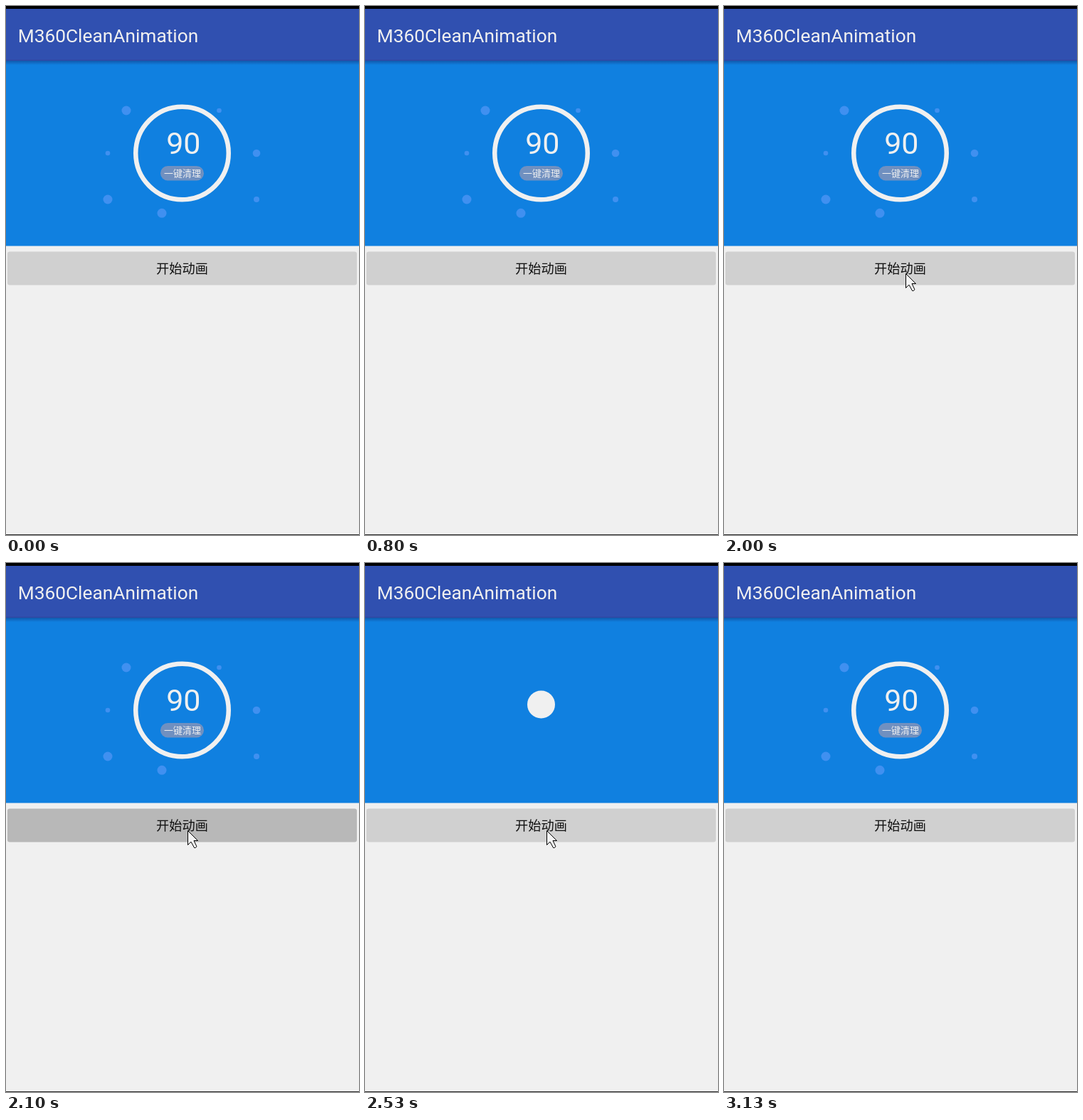
An HTML page that plays this animation: 496x744 px, repeating every 4.03 s.

```html
<!DOCTYPE html>
<html lang="zh-CN">
<head>
<meta charset="utf-8">
<title>M360CleanAnimation</title>
<style>
  html, body { margin: 0; width: 100%; height: 100%; overflow: hidden; background: #f0f0f0; }
  svg { display: block; width: 100vw; height: 100vh; }
  .latin { font-family: Roboto, sans-serif; fill: #f0f0f0; }
  .han { font-family: "Noto Sans CJK SC", "Noto Sans CJK", sans-serif; text-anchor: middle; }
</style>
</head>
<body>
<svg viewBox="0 0 496 744" preserveAspectRatio="none">
  <defs>
    <linearGradient id="shade" x1="0" y1="0" x2="0" y2="1">
      <stop offset="0" stop-color="#102060" stop-opacity=".4"/>
      <stop offset="1" stop-color="#102060" stop-opacity="0"/>
    </linearGradient>
  </defs>
  <rect width="496" height="744" fill="#f0f0f0"/>
  <rect y="77" width="496" height="260.5" fill="#1080e0"/>

  <g id="dots" fill="#4090f0"></g>
  <circle id="ball" cx="247.5" r="19.5" fill="#f0f0f0"/>
  <circle id="ring" cx="247.5" cy="207" fill="none" stroke="#f0f0f0" stroke-width="6.5"/>
  <g id="label">
    <text class="latin" x="249.3" y="208.3" font-size="43" text-anchor="middle">90</text>
    <rect x="217" y="225" width="61" height="20.5" rx="10.25" fill="#7090c0"/>
    <text class="han" x="248" y="240.2" font-size="13" fill="#f0f0f0">一键清理</text>
  </g>

  <rect y="77" width="496" height="6" fill="url(#shade)"/>
  <rect y="4" width="496" height="73" fill="#3050b0"/>
  <rect y="75.5" width="496" height="1.5" fill="#3048a4"/>
  <rect width="496" height="4" fill="#000"/>
  <text class="latin" x="16.7" y="51" font-size="26.3">M360CleanAnimation</text>

  <rect id="button" x="2" y="345.5" width="491" height="47" rx="3"/>
  <text class="han" x="247.5" y="376.3" font-size="18.2" fill="#101010">开始动画</text>
  <rect y="743" width="496" height="1" fill="#303030"/>
  <path id="cursor" d="M.5 .5V20.5L5 16.2L9.6 24.5H11.2L13 22.8L9 14.5H14.5Z"
        fill="#f4f4f4" stroke="#000" stroke-linejoin="round"/>
</svg>
<script>
const LOOP = 4030, STEP = 100, CLICK = 2130;
const CENTER = { x: 247.5, y: 207 };
const SPOTS = [[169, 147, 6.5], [299.5, 147, 3.3], [143, 207, 3.3], [352, 207, 5.3],
               [143, 272, 6.5], [219, 291.3, 6.5], [352, 272, 4]];

// Pointer strokes: start time, then one position per step; "hold" keeps the last one.
const STROKES = [
  { start: 100, path: [[440, 725], [470, 660], [475, 612], [438, 600], [378, 650], [387, 702], [417, 728]] },
  { start: 1100, path: [[72, 728], [105, 714], [140, 694], [170, 669], [190, 555], [201, 434],
                        [225, 403], [244, 384], [252, 378], [255, 376]], hold: 2830 },
  { start: 2830, path: [[225, 384], [128, 404], [24, 418]] }
];

const $ = id => document.getElementById(id);
const set = (el, attrs) => { for (const k in attrs) el.setAttribute(k, attrs[k]); };
const show = (el, on) => set(el, { visibility: on ? "visible" : "hidden" });
const ease = p => (1 - Math.cos(Math.PI * Math.min(1, p))) / 2;

const dots = SPOTS.map(() => $("dots").appendChild(
  document.createElementNS("http://www.w3.org/2000/svg", "circle")));

// The screen refreshes in steps, restarting at the click.
function snap(t) {
  const base = t < CLICK ? 0 : CLICK;
  return base + Math.floor((t - base) / STEP) * STEP;
}

function pointer(t) {
  for (const { start, path, hold } of STROKES) {
    const i = t < start ? -1 : Math.floor((t - start) / STEP);
    if (i >= 0 && i < path.length) return path[i];
    if (i >= path.length && t < hold) return path[path.length - 1];
  }
  return null;
}

// Falls for 300 ms, then springs back up.
function ballY(age) {
  return age <= 300 ? 79 + 235.5 * ease(age / 300)
                    : 314.5 - 115.5 * ease((age - 300) / 100);
}

function draw(now) {
  const t = snap(now % LOOP), age = t - CLICK;
  const idle = age < 0;

  show($("ball"), !idle && age < 500);
  set($("ball"), { cy: ballY(Math.max(0, age)) });

  show($("ring"), idle || age >= 500);
  set($("ring"), { r: age === 500 ? 70.75 : 65.25 });

  const ready = idle || age >= 700;
  show($("label"), ready);
  show($("dots"), ready);
  const spread = age === 700 ? 0.85 : 1;
  SPOTS.forEach(([x, y, r], i) => set(dots[i], {
    cx: CENTER.x + (x - CENTER.x) * spread,
    cy: CENTER.y + (y - CENTER.y) * spread,
    r: r * spread
  }));

  set($("button"), { fill: t === 2100 ? "#b8b8b8" : "#d0d0d0" });

  const at = pointer(t);
  show($("cursor"), at);
  if (at) set($("cursor"), { transform: `translate(${at})` });
}

const begin = performance.now();
function tick() {
  draw(performance.now() - begin);
  requestAnimationFrame(tick);
}
tick();
</script>
</body>
</html>
```
